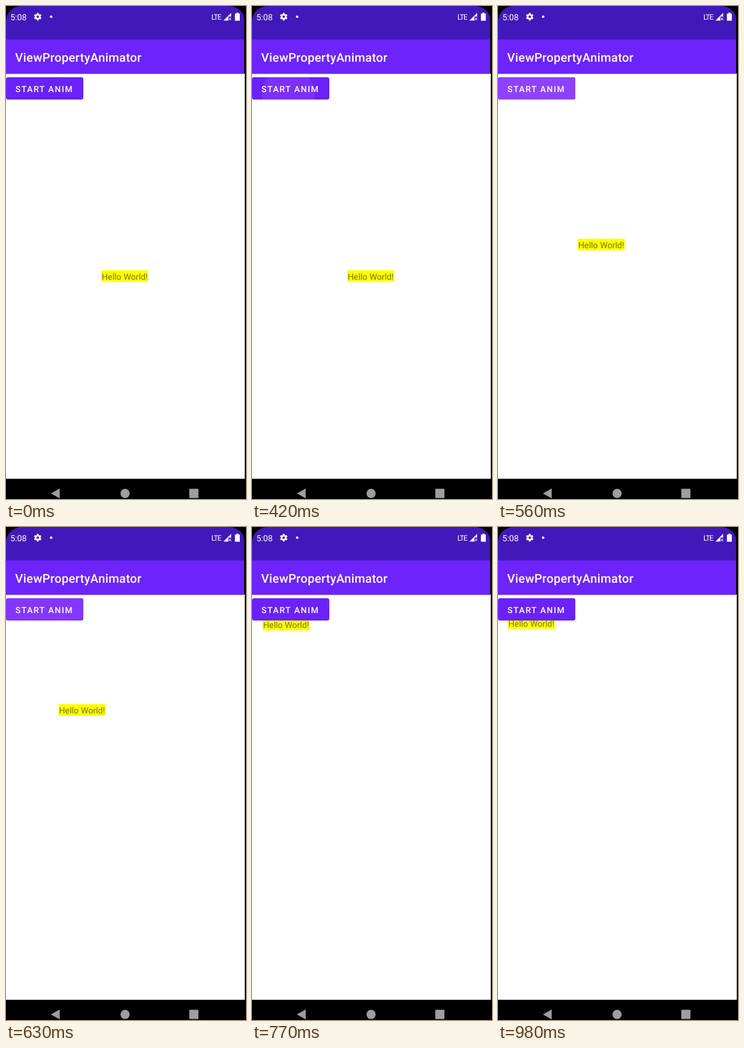
Animation, 388 px wide and 796 px high, one loop 1.75 s. Source, as an HTML page:

```html
<!DOCTYPE html>
<html lang="en">
<head>
<meta charset="utf-8">
<title>ViewPropertyAnimator</title>
<style>
  html, body { margin: 0; width: 100%; height: 100%; overflow: hidden; background: #000; }
  svg { display: block; width: 388px; height: 796px; font: 13.77px Roboto, sans-serif; text-rendering: geometricPrecision; }
  .title { font-size: 19.7px; font-weight: 500; letter-spacing: .0125em; }
  .label { font-weight: 500; letter-spacing: .1em; }
  .lte { font-size: 12px; letter-spacing: -1.1px; }
  #button { filter: drop-shadow(0 .8px .7px rgba(50, 15, 140, .6)); }
</style>
</head>
<body>
<svg viewBox="0 0 388 796">
  <defs>
    <clipPath id="screen"><rect width="386" height="830" rx="25"/></clipPath>
    <clipPath id="shape"><rect y="115" width="125" height="36" rx="4"/></clipPath>
    <linearGradient id="edge" x2="0" y2="1">
      <stop stop-color="#4118b9"/><stop offset="1" stop-color="#6c24fa"/>
    </linearGradient>
  </defs>
  <rect width="388" height="796"/>
  <g clip-path="url(#screen)">
    <rect y="109" width="386" height="655" fill="#fff"/>
    <rect width="385" height="54" fill="#4118b9"/>
    <rect y="54" width="385" height="55.6" fill="#6c24fa"/>
    <rect y="52.5" width="385" height="3" fill="url(#edge)"/>

    <g fill="#fff">
      <text x="7" y="23">5:08</text>
      <g fill="none" stroke="#fff">
        <circle cx="51.3" cy="17.3" r="3.4" stroke-width="2.8"/>
        <circle cx="51.3" cy="17.3" r="5.2" stroke-width="2" pathLength="12" stroke-dasharray="1" stroke-dashoffset="1.5"/>
      </g>
      <circle cx="73" cy="17.3" r="2"/>
      <text class="lte" x="332" y="21.5">LTE</text>
      <path d="M351.5 23.5 L364 11 V17 H359.5 V23.5 Z"/>
      <path d="M360.5 18.7 l3.5 4.3 m0 -4.3 l-3.5 4.3" stroke="#fff"/>
      <path d="M372.3 10.8 h3.5 v1.5 h2.2 v11.5 h-8 v-11.5 h2.3 Z"/>
      <text class="title" x="14.8" y="90">ViewPropertyAnimator</text>
    </g>

    <g id="hello">
      <rect x="154" y="426.6" width="75.8" height="18.9" fill="#ff0"/>
      <text x="154.8" y="441.5" fill="#757500">Hello World!</text>
    </g>

    <g id="button">
      <rect y="115" width="125" height="36" rx="4" fill="#6a22f9"/>
      <g clip-path="url(#shape)"><circle id="ripple" fill="#9a4cff"/></g>
      <text class="label" x="15.3" y="138.5" fill="#fff">START ANIM</text>
    </g>

    <rect y="763.4" width="386" height="33"/>
    <g fill="#9e9e9e">
      <path d="M72.6 787 L86.8 779 V795 Z"/>
      <circle cx="192.5" cy="787" r="7.4"/>
      <rect x="296.3" y="779.4" width="14.8" height="15" rx="1"/>
    </g>
  </g>
</svg>
<script>
const LOOP = 1750, STEP = 70;
const hello = document.getElementById('hello');
const ripple = document.getElementById('ripple');
const clamp = x => Math.max(0, Math.min(1, x));
const setAll = (el, attrs) => {
  for (const name in attrs) el.setAttribute(name, attrs[name]);
};

function draw(now) {
  const t = Math.floor(now % LOOP / STEP) * STEP;

  // accelerate-decelerate slide to the top left
  const p = (1 - Math.cos(Math.PI * clamp((t - 471) / 318))) / 2;
  hello.setAttribute('transform', `translate(${-138 * p} ${-281 * p})`);

  // touch ripple: grows towards the button's centre, then fades
  const rest = Math.exp(-Math.max(0, t - 372) / 46);
  setAll(ripple, {
    cx: 62 - 9 * rest,
    cy: 133 + 30 * rest,
    r: 66 * (1 - rest),
    opacity: .75 * clamp((t - 385) / 75) * clamp((775 - t) / 210)
  });
  requestAnimationFrame(draw);
}
requestAnimationFrame(draw);
</script>
</body>
</html>
```
